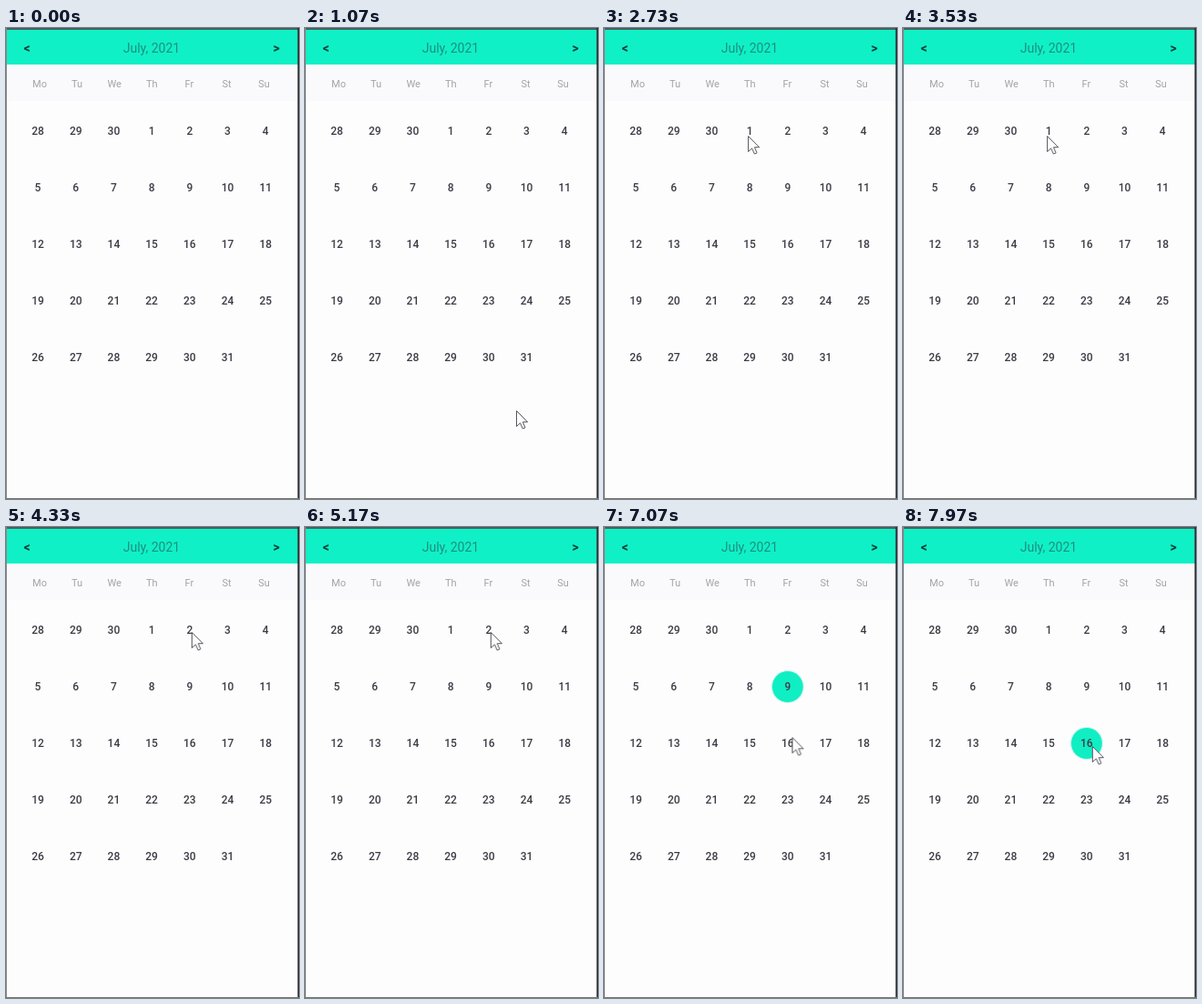
Write an HTML page that moves like this. It is 322x516 px and loops after 8 s.

```html
<!DOCTYPE html>
<html lang="en">
<head>
<meta charset="utf-8">
<title>Calendar</title>
<style>
  html, body { margin: 0; width: 100%; height: 100%; overflow: hidden; background: #fdfdfd; }
  svg { display: block; width: 322px; height: 516px; }
  text { font-family: Roboto, sans-serif; text-anchor: middle; }
  .title { font-size: 14px; fill: #1d8f80; }
  .arrow { font-size: 14px; font-weight: 700; fill: #0a3f3a; }
  .weekday { font-size: 11px; fill: #a2a2a8; }
  .day { font-size: 12px; font-weight: 500; fill: #3c3c46; }
</style>
</head>
<body>
<svg viewBox="0 0 322 516">
  <rect width="322" height="516" fill="#fdfdfd"/>
  <rect y="40" width="322" height="40" fill="#fafafd"/>
  <rect width="322" height="40" fill="#10f0c6"/>
  <rect width="322" height="2" fill="#4a5f5a"/>
  <rect width="1" height="516" fill="#8a8a8a"/>
  <rect x="320.5" width="1.5" height="516" fill="#292929"/>
  <rect y="515" width="322" height="1" fill="#77776a"/>
  <circle id="selection" r="17.5" fill="#10eec4" stroke="#e4f6f0" opacity="0"/>
  <g id="labels"></g>
  <path id="cursor" d="M.5 .5V17.5L4.5 13.8L7.3 20L10 18.8L7.4 12.7H12.6Z"
        fill="#fdfdfd" stroke="#55555e" stroke-linejoin="round"/>
</svg>
<script>
const LOOP = 8000;
const TRAVEL = 400;
const CLICK_DELAY = 200;
const labels = document.getElementById('labels');

function label(content, x, y, kind) {
  const node = document.createElementNS('http://www.w3.org/2000/svg', 'text');
  node.setAttribute('x', x);
  node.setAttribute('y', y);
  node.setAttribute('class', kind);
  node.textContent = content;
  labels.append(node);
}

// Centre of a day's cell; July 1 is the fourth cell of the grid.
function cell(day) {
  const index = day + 2;
  return { x: 35 + index % 7 * 41.7, y: 113 + Math.floor(index / 7) * 62 };
}

label('July, 2021', 160, 26.5, 'title');
label('<', 23, 27, 'arrow');
label('>', 297, 27, 'arrow');
['Mo', 'Tu', 'We', 'Th', 'Fr', 'St', 'Su'].forEach((name, i) =>
  label(name, 37 + i * 41.1, 65, 'weekday'));
for (let day = -2; day <= 31; day++) {
  const { x, y } = cell(day);
  label(day > 0 ? day : day + 30, x, y + 4.3, 'day');
}

// A stop is a point near a day's cell; a click there selects the day.
function stop(arrive, day, dx, dy, click = false) {
  const { x, y } = cell(day);
  return { arrive, day, x: x + dx, y: y + dy, click };
}
const entry = { x: 250, y: 520 };
const stops = [
  { arrive: 1070, x: 232, y: 419 },
  stop(1830, 2, -8, 24),
  stop(2500, 1, -2, 5),
  stop(4200, 2, 2, 2),
  stop(5700, 9, -3, -2, true),
  stop(7200, 16, 6, 3, true)
];

const timing = { duration: LOOP, iterations: Infinity };
const frame = (time, { x, y }, extra) =>
  ({ offset: time / LOOP, transform: `translate(${x}px, ${y}px)`, ...extra });

// The pointer rests at each stop, then glides to the next one.
const glide = { easing: 'ease-out' };
document.getElementById('cursor').animate([
  frame(0, entry),
  ...stops.flatMap((to, i) => [
    frame(to.arrive - TRAVEL, stops[i - 1] || entry, glide),
    frame(to.arrive, to)
  ]),
  frame(LOOP, stops.at(-1))
], timing);

const clicks = stops.filter(s => s.click);
const hold = opacity => ({ opacity, easing: 'step-end' });
document.getElementById('selection').animate([
  frame(0, cell(clicks[0].day), hold(0)),
  ...clicks.map(s => frame(s.arrive + CLICK_DELAY, cell(s.day), hold(1))),
  frame(LOOP, cell(clicks.at(-1).day), hold(1))
], timing);
</script>
</body>
</html>
```
